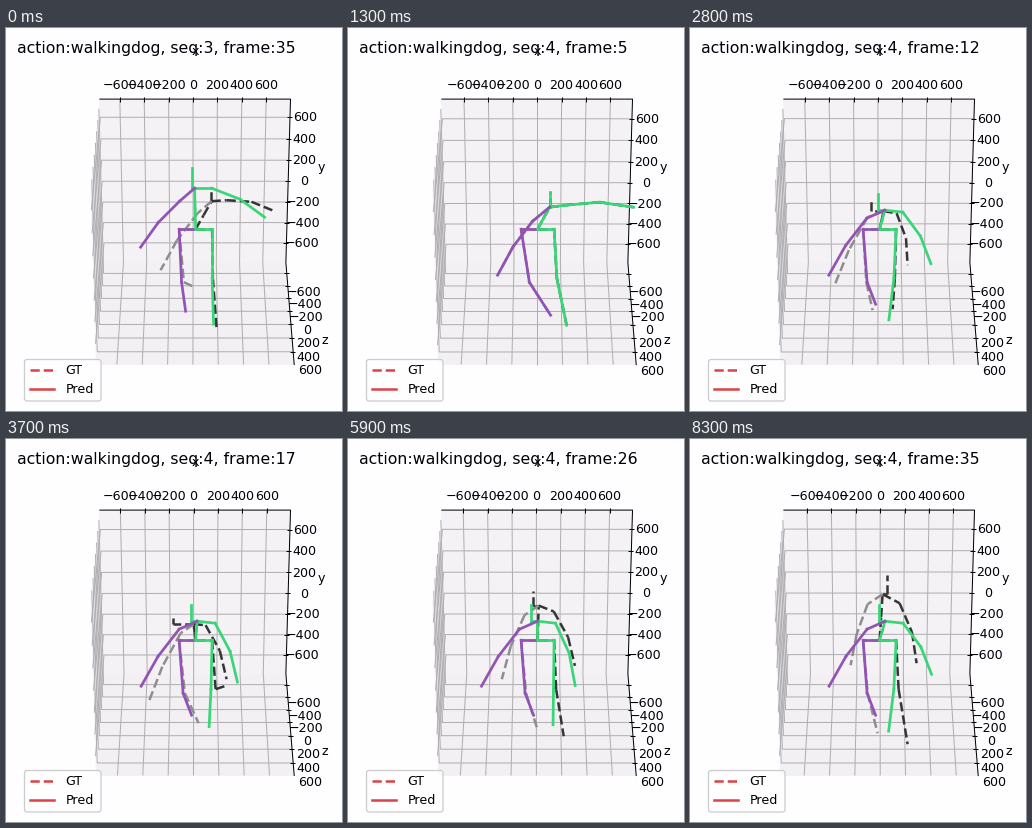
These frames come from a looping animation (336x383 px, 8.5 s). A matplotlib script:

```python
import numpy as np
import matplotlib.pyplot as plt
from matplotlib.animation import FuncAnimation
from matplotlib.collections import LineCollection
from matplotlib.patches import FancyBboxPatch, Polygon

W, H, DPI = 336, 383, 100
STEP, FRAMES = 100, 85
TICKS = range(-600, 601, 200)
HALF = 0.5208               # half side of the cube, slightly beyond the limits
CENTER = (189.2, 201.3)
SCALE, DIST = 1865, 10
SIN, COS = np.sin(np.pi / 3), np.cos(np.pi / 3)
FONT, TITLE_FONT = 9.1, 11.3
THIN = 0.72


def project(x, y, z):
    """Perspective view of the cube, tilted by 60 degrees."""
    zoom = SCALE / (DIST - COS * y - SIN * z)
    return CENTER[0] + x * zoom, CENTER[1] - (SIN * y - COS * z) * zoom


# ---- skeleton -------------------------------------------------------------

ROOT = np.array((189.6, 201.2))
HIP = np.array((16.5, 0))


def pose(*points):
    """Offsets from the root: head, neck, then left and right shoulder and
    wrist, then left and right ankle."""
    return np.array(points, float)


LAST_TRUTH = pose((15, -38), (16, -28), (31, -29), (79, -18),
                  (2, -16), (-35, 41), (21, 99), (-1, 58))
LAST_GUESS = pose((-4, -61), (-1, -41), (16, -41), (69, -12),
                  (-16, -28), (-55, 18), (18, 95), (-10, 82))
OBSERVED = pose((12, -37), (12, -22), (28, -24), (96, -22),
                (-5, -8), (-40, 46), (29, 96), (13, 86))
STOOP = pose((-9, -30), (4, -18), (17, -16), (28, 36),
             (-12, -12), (-45, 56), (13, 80), (-7, 81))
STRIDE = pose((-23, -22), (-2, -16), (10, -15), (31, 39),
              (-15, -7), (-47, 62), (23, 83), (3, 83))
UPRIGHT = pose((7, -65), (3, -46), (20, -37), (37, 23),
               (-12, -36), (-29, 25), (28, 104), (-2, 93))
REST = pose((-4.5, -35), (2, -19), (20, -17), (43, 41),
            (-16, -11), (-54, 46), (13, 87), (-4, 75))
L_WRIST, L_ANKLE = 3, 6


def mix(a, b, w):
    return a + (b - a) * np.clip(w, 0, 1)


def bump(n, peak, width=5):
    return max(0, 1 - abs(n - peak) / width)


def true_pose(n):
    if n < 17:
        p = mix(mix(OBSERVED, STOOP, (n - 5) / 7), STRIDE, (n - 12) / 5)
    else:
        p = mix(STRIDE, UPRIGHT, 1 - (1 - (n - 17) / 18) ** 1.4)
    p[L_ANKLE] += np.array((9, -38)) * bump(n, 17)    # foot tucked up
    p[L_WRIST] += np.array((13, -17)) * bump(n, 22)   # hand raised
    return p


def guessed_pose(n):
    """Follows the truth for ten labels, then sways about a resting pose."""
    sway = np.cos(2 * np.pi * (n - 10.5) / 24)
    p = REST.copy()
    p[:L_ANKLE, 0] += 3.5 * sway
    p[L_WRIST] += np.array((5.5, -7)) * sway
    p[L_ANKLE] += np.array((-4, 4)) * sway
    return mix(true_pose(min(n, 10)), p, (n - 10) / 2)


def elbow(shoulder, wrist, bulge):
    dx, dy = wrist - shoulder
    return (shoulder + wrist) / 2 + bulge * np.array((dy, -dx)) / np.hypot(dx, dy)


def bones(p):
    """Segments in drawing order: legs, back and head, arms."""
    head, neck, l_sho, l_wri, r_sho, r_wri, l_ank, r_ank = p
    root = np.zeros(2)
    l_knee = np.array((16 + (l_ank[0] - 16) / 4, 49))
    r_knee = np.array((-12 + (r_ank[0] + 2) / 4, 53))
    chains = [
        [root, -HIP, r_knee, r_ank],
        [root, HIP, l_knee, l_ank],
        [root, neck / 2, neck, (head[0], neck[1]), head],
        [neck, l_sho, elbow(l_sho, l_wri, 4), l_wri],
        [neck, r_sho, elbow(r_sho, r_wri, -2.5), r_wri],
    ]
    return [ROOT + np.array(pair) for c in chains for pair in zip(c, c[1:])]


# ---- timing ---------------------------------------------------------------

START = 300
TIMES = [START, 1300, 2800, 3700, 5000, 6900, 8300]
LABELS = [1, 5.5, 12.5, 17.5, 22.5, 31.5, 35]


def state(t):
    """Sequence, label, both poses and the drift of the ticks."""
    if t < START:
        return 3, 35, LAST_TRUTH, LAST_GUESS, (-0.012, 0.010, 0)
    n = int(np.interp(t, TIMES, LABELS))
    drift = (-0.009 * np.sin(np.pi * (n - 5) / 25), 0.005 * n / 35, 0.002)
    return 4, n, true_pose(n), guessed_pose(n), drift


# ---- fixed scene ----------------------------------------------------------

plt.rcParams["font.family"] = "DejaVu Sans"
fig = plt.figure(figsize=(W / DPI, H / DPI), dpi=DPI, facecolor="#fefdff")
ax = fig.add_axes([0, 0, 1, 1])
ax.set_xlim(0, W)
ax.set_ylim(H, 0)
ax.axis("off")

h = HALF
panes = [
    ("#f8f6f9", [(-h, h, -h), (-h, -h, -h), (-h, -h, h), (-h, h, h)]),
    ("#f2f0f3", [(-h, -h, -h), (h, -h, -h), (h, -h, h), (-h, -h, h)]),
    ("#f4f2f5", [(-h, h, -h), (h, h, -h), (h, -h, -h), (-h, -h, -h)]),
]
for color, corners in panes:
    ax.add_patch(Polygon([project(*c) for c in corners], fc=color,
                         ec=color, lw=0.5, zorder=0))

edge = [project(*p) for p in [(-h, h, -h), (h, h, -h), (h, -h, -h), (h, -h, h)]]
ax.plot(*zip(*edge), color="black", lw=THIN, zorder=2)


def lines(color, width, zorder, **kw):
    return ax.add_collection(LineCollection([], colors=color, linewidths=width,
                                            zorder=zorder, **kw), autolim=False)


def label(x, y, text, size=FONT, **kw):
    return ax.text(x, y, text, fontsize=size, color="black", zorder=6, **kw)


def skeleton(left, right, width, zorder, **kw):
    colors = [right] * 3 + [left] * 10 + [right] * 3
    return lines(colors, width, zorder, **kw)


grid = lines("#b0aeb1", THIN, 1)
marks = lines("black", THIN, 2)
truth_art = skeleton("#353535", "#8e8e8e", 1.8, 3, linestyles="--")
guess_art = skeleton("#38d676", "#9353b5", 1.95, 4, capstyle="projecting")

title = label(11, 24.5, "", TITLE_FONT)
for x, y, name in [(189.2, 23.3, "x"), (315, 139, "y"), (319, 312.5, "z")]:
    label(x, y, name, ha="center", va="center")
numbers = [[label(0, 0, str(v).replace("-", "\u2212"), ha="center")
            for v in TICKS] for _ in range(3)]

ax.add_patch(FancyBboxPatch((18.5, 331.5), 76.5, 41.5,
                            boxstyle="round,pad=0,rounding_size=2.5",
                            fc=(1, 1, 1, 0.8), ec="#cccccc", lw=0.9, zorder=5))
for y, name, style in [(341.5, "GT", "--"), (361, "Pred", "-")]:
    ax.plot([23.5, 48], [y, y], color="#db4347", lw=1.8, ls=style, zorder=6)
    label(59.5, y + 4.4, name)


# ---- animation ------------------------------------------------------------

def tick_parts(axis, v):
    """Bent grid line, tick mark and number position for one tick."""
    if axis == 0:
        bend = [(v, h, -h), (v, -h, -h), (v, -h, h)]
        x, y = project(v, h, -h)
        return bend, [(x, y - 2), (x, y + 3)], (x, y - 15)
    if axis == 1:
        bend = [(h, v, -h), (-h, v, -h), (-h, v, h)]
        x, y = project(h, v, -h)
        return bend, [(x - 3, y), (x + 2, y)], (x + 15.5 - v, y - 0.5)
    bend = [(h, -h, v), (-h, -h, v), (-h, h, v)]
    x, y = project(h, -h, v)
    return bend, [(x - 3, y), (x + 2, y)], (x + 17 - v, y + 18)


def update(i):
    seq, n, truth, guess, drift = state(i * STEP)
    title.set_text(f"action:walkingdog, seq:{seq}, frame:{n}")
    bends, ticks = [], []
    for axis in range(3):
        for value, text in zip(TICKS, numbers[axis]):
            bend, mark, (x, y) = tick_parts(axis, value / 1500 + drift[axis])
            bends.append([project(*p) for p in bend])
            ticks.append(mark)
            text.set_position((x, y + 4.6))
    grid.set_segments(bends)
    marks.set_segments(ticks)
    truth_art.set_segments(bones(truth))
    guess_art.set_segments(bones(guess))
    return []


anim = FuncAnimation(fig, update, frames=FRAMES, interval=STEP,
                     init_func=lambda: update(0), repeat=True, repeat_delay=0)
plt.show()
```
